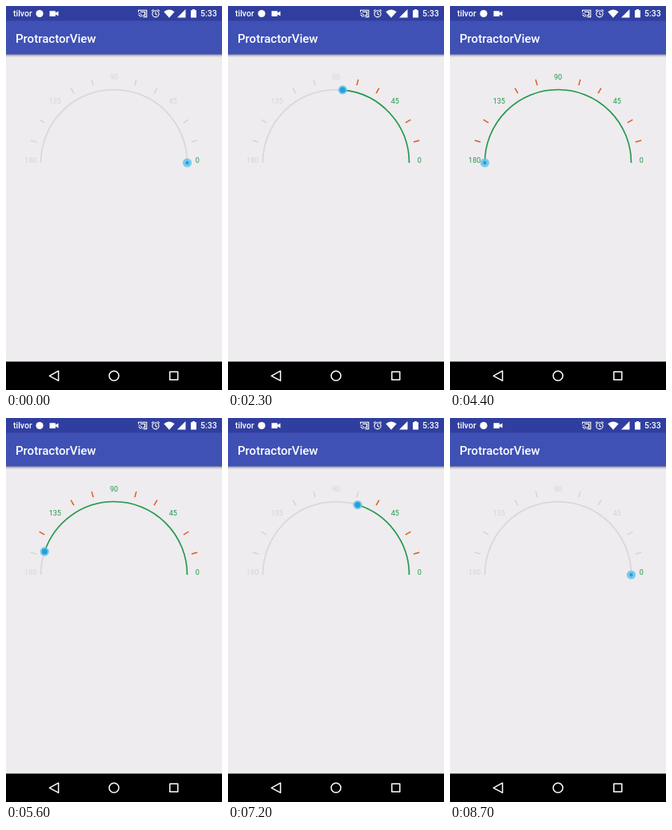
Animation, 270 px wide and 480 px high, one loop 8800 ms. Source, as an HTML page:

```html
<!DOCTYPE html>
<html lang="en">
<head>
<meta charset="utf-8">
<title>ProtractorView</title>
<style>
  html, body { margin: 0; width: 100%; height: 100%; overflow: hidden; background: #eeecee; }
  svg { display: block; width: 100%; height: 100%; font-family: Roboto, sans-serif; }
  .bar-text { font-size: 10.5px; font-weight: 500; fill: #fff; }
  .title { font-size: 15px; font-weight: 500; fill: #fff; }
  .track { fill: none; stroke: #d9d8da; stroke-width: 1.8; }
  .progress { fill: none; stroke: #219a4b; stroke-width: 1.6; }
  .tick { stroke: #d5d4d6; stroke-width: 1.5; }
  .tick.on { stroke: #de5b24; }
  .label { font-size: 9px; text-anchor: middle; fill: #d5d4d6; }
  .label.on { fill: #219a4b; }
  .line { fill: none; stroke: #fff; }
</style>
</head>
<body>
<svg viewBox="0 0 270 480">
  <defs>
    <linearGradient id="shade" x2="0" y2="1">
      <stop stop-color="#8f8f9d"/>
      <stop offset="1" stop-color="#eeecee"/>
    </linearGradient>
  </defs>
  <rect width="270" height="480" fill="#eeecee"/>
  <rect y="60" width="270" height="4" fill="url(#shade)"/>
  <rect width="270" height="60.5" fill="#3f51b5"/>
  <rect width="270" height="18.5" fill="#303f9f"/>
  <rect y="444.5" width="270" height="35.5"/>

  <!-- status bar -->
  <text class="bar-text" x="9" y="13.3">tilvor</text>
  <circle cx="42" cy="9.5" r="4.6" fill="#fff"/>
  <path d="M54.5 6.2h7.3v2.4l3.7-2v6l-3.7-2v2.4h-7.3z" fill="#fff"/>
  <g class="line" stroke-width="1.1">
    <path d="M165.6 7.4V5.2h10.2v8.4h-4.2M165.5 9a4.6 4.6 0 0 1 4.6 4.6M165.5 11.2a2.5 2.5 0 0 1 2.5 2.5"/>
    <path d="M168 7.3h5.6v4.3h-2.4" stroke-width="1.3"/>
    <circle cx="187" cy="9.8" r="4.1"/>
    <path d="M187 7.2v2.9l2 1.2M182 6.4l2.4-2M192 6.4l-2.4-2"/>
  </g>
  <g fill="#fff">
    <path d="M197.3 7.2Q204 2 210.7 7.2L204 14.8z"/>
    <path d="M214 14.5L224.5 4v10.5z"/>
    <path d="M231 5.2h2V4h3v1.2h2v9.3h-7z"/>
  </g>
  <text class="bar-text" x="243" y="13.3">5:33</text>
  <text class="title" x="12" y="45.8">ProtractorView</text>

  <!-- protractor -->
  <path class="track" d="M226.5 196A91.5 91.5 0 0 0 43.5 196"/>
  <path class="progress" id="progress" pathLength="180" d="M226.5 196A91.5 91.5 0 0 0 43.5 196"/>
  <g id="scale"></g>
  <g id="thumb">
    <circle r="5.6" fill="#6cc5ec" fill-opacity=".9"/>
    <circle id="core" r="2.2" fill="#279fd8"/>
  </g>

  <!-- navigation bar -->
  <g class="line" stroke-width="1.5" stroke-linejoin="round">
    <path d="M54.3 462.3L65.6 456.2v12.2z"/>
    <circle cx="135" cy="462.3" r="6"/>
    <path d="M204.8 457.3h10v10h-10z"/>
  </g>
</svg>
<script>
const LOOP = 8800, STEP = 100;
const CENTER = { x: 135, y: 196 }, RADIUS = 91.5;
const $ = id => document.getElementById(id);

// [time in ms, angle in degrees]
const drag = [
  [0, 0], [150, 0], [900, 31], [1500, 64.4], [2700, 95], [3200, 134.8],
  [3600, 155], [4100, 180], [5150, 180], [6000, 145], [6400, 111.8],
  [6900, 86], [7800, 46.5], [7900, 37], [8500, 0], [LOOP, 0]
];

function angleAt(time) {
  const next = drag.findIndex(([t]) => t > time);
  const [t0, a0] = drag[next - 1], [t1, a1] = drag[next];
  return a0 + (a1 - a0) * (time - t0) / (t1 - t0);
}

function polar(angle, radius) {
  const rad = angle * Math.PI / 180;
  return { x: CENTER.x + radius * Math.cos(rad), y: CENTER.y - radius * Math.sin(rad) };
}

function addToScale(name, attributes, text = '') {
  const node = document.createElementNS('http://www.w3.org/2000/svg', name);
  for (const key in attributes) node.setAttribute(key, attributes[key]);
  node.textContent = text;
  $('scale').append(node);
  return node;
}

const marks = [];
for (let angle = 0; angle <= 180; angle += 15) {
  let node;
  if (angle % 45 === 0) {
    node = addToScale('text', { class: 'label', ...polar(angle, 104.3) }, angle);
  } else {
    const a = polar(angle, 100.3), b = polar(angle, 107.8);
    node = addToScale('line', { class: 'tick', x1: a.x, y1: a.y, x2: b.x, y2: b.y });
  }
  marks.push({ angle, node });
}

function draw(now) {
  const time = Math.floor(now % LOOP / STEP) * STEP;
  const angle = angleAt(time);
  const pressed = (time >= 100 && time < 4400) || (time >= 5200 && time < 8700);
  const { x, y } = polar(angle, RADIUS);
  $('thumb').setAttribute('transform', `translate(${x} ${y})`);
  $('core').setAttribute('r', pressed ? 3.6 : 2.2);
  $('progress').setAttribute('stroke-dasharray', `${angle} 400`);
  for (const mark of marks) mark.node.classList.toggle('on', mark.angle <= angle);
}

function tick(now) {
  draw(now);
  requestAnimationFrame(tick);
}
draw(0);
requestAnimationFrame(tick);
</script>
</body>
</html>
```
